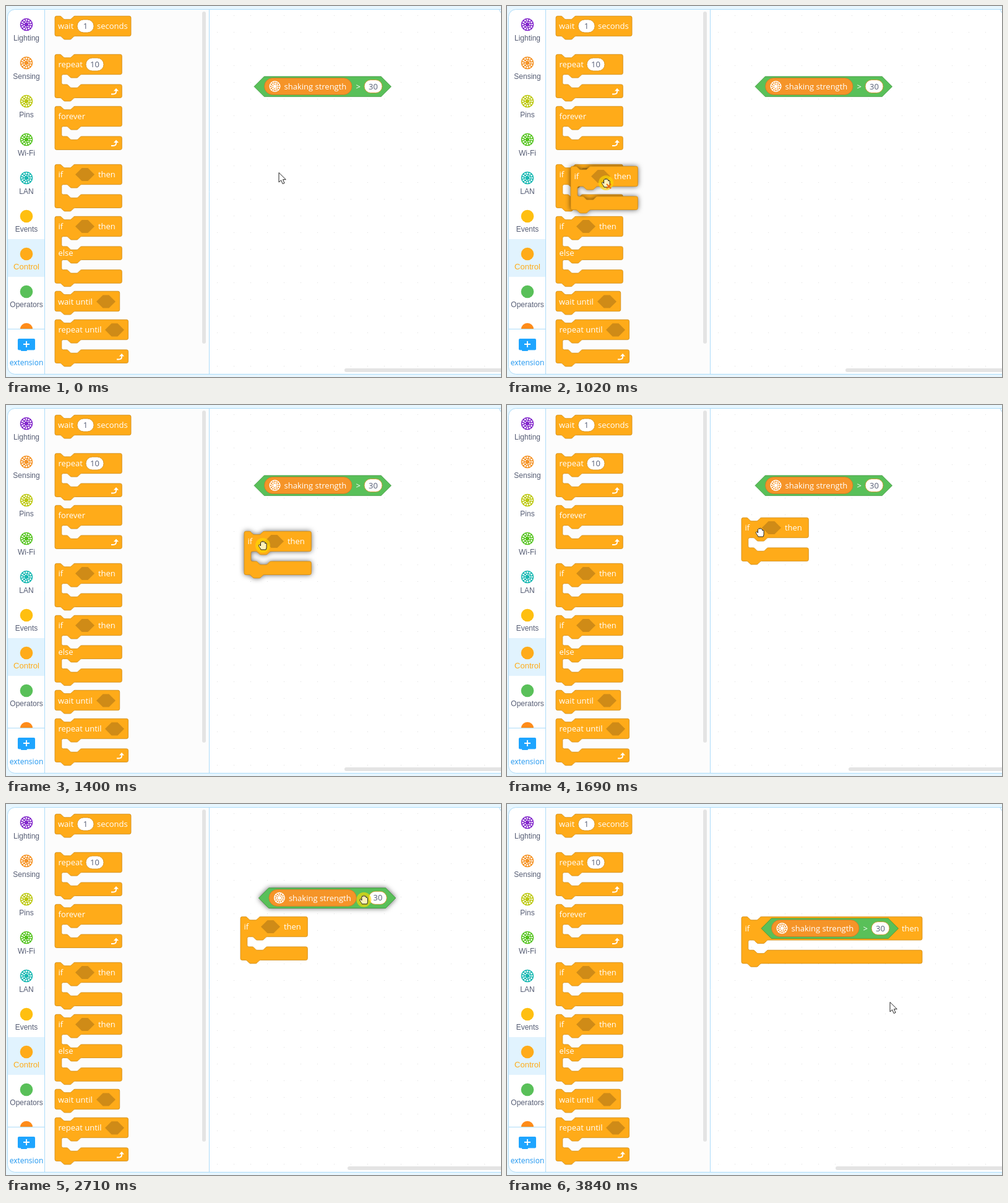
Animation of 800x600 px, one loop 4120 ms. Source, as an HTML page with a canvas:

```html
<!DOCTYPE html>
<html lang="en">
<head>
<meta charset="utf-8">
<title>Block editor</title>
<style>
  html, body { margin: 0; width: 100%; height: 100%; overflow: hidden; }
  canvas { display: block; }
</style>
</head>
<body>
<canvas id="stage" width="800" height="600"></canvas>
<script>
const ctx = document.getElementById('stage').getContext('2d');
const LOOP = 4120, UNIT = 0.675;
const ORANGE = '#ffab19', BROWN = '#cf8b17', GREEN = '#59c059', LINE = '#addcf9', INK = '#575e75';
const LABEL = '13px "Open Sans", sans-serif', SIDE = '12px "Liberation Sans", Arial, sans-serif';

const TICKS = [0, 180, 270, 370, 460, 560, 650, 730, 820, 920, 1020, 1130, 1220, 1300, 1400, 1480,
  1570, 1670, 1760, 1970, 2060, 2150, 2230, 2330, 2430, 2510, 2610, 2710, 2810, 2910, 3010,
  3090, 3170, 3450, 3540, 3640, 3740, 3840];

// Waypoints: [time, x, y]
const POINTER = [[90, 441, 269], [650, 132, 287], [820, 109, 280], [920, 112, 281], [1020, 160, 286],
  [1130, 291, 265], [1220, 371, 238], [1300, 398, 229], [1400, 415, 227], [1570, 409, 206],
  [1670, 409, 206], [1760, 404, 210], [1880, 404, 210], [2230, 586, 160], [2430, 571, 136],
  [2510, 571, 133], [3010, 592, 195], [3170, 583, 204], [3360, 583, 204], [3840, 619, 320]];
const IF_PATH = [[920, 79, 256], [1020, 103, 259], [1130, 263, 235], [1220, 343, 214],
  [1300, 370, 206], [1400, 385, 204], [1570, 379, 182]];
const TEST_PATH = [[2510, 401, 130], [3010, 422, 192], [3170, 413, 201], [3450, 411, 201]];

function along(path, t) {
  const i = path.findIndex(p => p[0] > t);
  if (i === 0) return path[0].slice(1);
  if (i < 0) return path[path.length - 1].slice(1);
  const a = path[i - 1], b = path[i];
  const u = (t - a[0]) / (b[0] - a[0]), k = u * u * (3 - 2 * u);
  return [a[1] + (b[1] - a[1]) * k, a[2] + (b[2] - a[2]) * k];
}

function text(str, x, y, color = '#fff', font = LABEL, align = 'left') {
  ctx.font = font;
  ctx.textAlign = align;
  ctx.fillStyle = color;
  ctx.fillText(str, x, y);
}

function rect(x, y, w, h, color) {
  ctx.fillStyle = color;
  ctx.fillRect(x, y, w, h);
}

function pill(x, y, w, h, color, border, r = h / 2) {
  ctx.beginPath();
  ctx.roundRect(x, y, w, h, r);
  ctx.fillStyle = color;
  ctx.fill();
  if (border) { ctx.strokeStyle = border; ctx.lineWidth = 0.8; ctx.stroke(); }
}

function disc(x, y, r, color) {
  ctx.beginPath();
  ctx.arc(x, y, r, 0, 7);
  ctx.fillStyle = color;
  ctx.fill();
}

function line(color, width, ...pts) {
  ctx.beginPath();
  pts.forEach(([x, y]) => ctx.lineTo(x, y));
  ctx.strokeStyle = color;
  ctx.lineWidth = width;
  ctx.stroke();
}

function dottedDisc(x, y, r, color, dots) {
  disc(x, y, r, color);
  for (const [n, dist, size] of [[12, 0.72, 0.13], [7, 0.4, 0.11]])
    for (let i = 0; i < n; i++) {
      const a = i / n * Math.PI * 2;
      disc(x + Math.cos(a) * r * dist, y + Math.sin(a) * r * dist, r * size, dots);
    }
}

function hexagon(x, cy, w, half) {
  ctx.beginPath();
  [[0, 0], [half, -half], [w - half, -half], [w, 0], [w - half, half], [half, half]]
    .forEach(([dx, dy]) => ctx.lineTo(x + dx, cy + dy));
  ctx.closePath();
}

function slot(x, cy, lit) {
  hexagon(x, cy, 31, 10.6);
  ctx.fillStyle = BROWN;
  ctx.fill();
  if (lit) { ctx.strokeStyle = '#fff'; ctx.lineWidth = 2.5; ctx.stroke(); }
}

function number(str, x, cy, w) {
  pill(x, cy - 10.5, w, 21, '#fff', BROWN);
  text(str, x + w / 2, cy + 4.5, INK, LABEL, 'center');
}

function liftShadow(on) {
  ctx.shadowColor = on ? 'rgba(0,0,0,.65)' : 'transparent';
  ctx.shadowBlur = on ? 8 : 0;
}

const NOTCH = 'c2,0 3,1 4,2l4,4c1,1 2,2 4,2h12c2,0 3,-1 4,-2l4,-4c1,-1 2,-2 4,-2';
const BUMP = 'c-2,0 -3,1 -4,2l-4,4c-1,1 -2,2 -4,2h-12c-2,0 -3,-1 -4,-2l-4,-4c-1,-1 -2,-2 -4,-2';

// Rows are the heights of the solid bars; an open mouth sits between each two
function block(x, y, width, rows, { lifted = false, cap = false } = {}) {
  const w = width / UNIT, top = `h8${NOTCH}H${w - 4}a4,4 0 0 1 4,4`;
  const d = `M0,4a4,4 0 0 1 4,-4${top}` + rows.map(h => `v${h - 8}a4,4 0 0 1 -4,4`)
    .join(`H64${BUMP}h-8a4,4 0 0 0 -4,4v16a4,4 0 0 0 4,4${top}`) +
    (cap ? '' : `H48${BUMP}`) + 'H4a4,4 0 0 1 -4,-4z';
  const shape = new Path2D(d);
  ctx.save();
  ctx.translate(x, y + 0.3);
  ctx.scale(UNIT, UNIT);
  liftShadow(lifted);
  ctx.fillStyle = ORANGE;
  ctx.fill(shape);
  liftShadow(false);
  ctx.strokeStyle = BROWN;
  ctx.lineWidth = 1.2;
  ctx.stroke(shape);
  ctx.restore();
}

function loopArrow(x, y) {
  ctx.strokeStyle = '#fff';
  ctx.lineWidth = 1.8;
  ctx.stroke(new Path2D(`M${x - 6},${y + 4}h3q5,0 5,-4v-2`));
  ctx.fillStyle = '#fff';
  ctx.fill(new Path2D(`M${x - 2},${y - 1}l4,-4.5l4,4.5z`));
}

function ifBlock(x, y, { lifted, lit, wide } = {}) {
  block(x, y, wide ? 292 : 108.3, [wide ? 56 : 48, 32], { lifted });
  const base = y + (wide ? 24 : 21);
  text('if', x + 5.5, base);
  text('then', x + (wide ? 259 : 70), base);
  if (!wide) slot(x + 33, y + 16.5, lit);
}

function testBlock(x, cy, lifted) {
  hexagon(x, cy + 0.3, 221.5, 16.3);
  liftShadow(lifted);
  ctx.fillStyle = GREEN;
  ctx.fill();
  liftShadow(false);
  ctx.strokeStyle = '#389438';
  ctx.lineWidth = 0.8;
  ctx.stroke();
  pill(x + 16.5, cy - 13.5, 141.5, 27, '#f59428', '#c87a24');
  dottedDisc(x + 33.5, cy, 9, '#fff', '#f59428');
  text('shaking strength', x + 48.5, cy + 5);
  text('>', x + 164.5, cy + 5);
  number('30', x + 178, cy, 29);
}

function sidebar() {
  rect(3, 377, 59, 61, '#e1f3fe');
  const items = [['Lighting', '#8429cc'], ['Sensing', '#f59428'], ['Pins', '#bcc80f'], ['Wi-Fi', '#55c41e'],
    ['LAN', '#1bb9b3'], ['Events', '#ffbf10'], ['Control', ORANGE], ['Operators', GREEN]];
  items.forEach(([name, color], i) => {
    const y = i < 5 ? 30 + 62 * i : 340 + 61 * (i - 5);
    if (i < 5) dottedDisc(33, y, 10.3, color, '#fff');
    else disc(33, y, 10.3, color);
    const active = name === 'Control';
    text(name, 33, y + (i < 5 ? 26 : 25), active ? ORANGE : INK, active ? SIDE.replace('12', '13') : SIDE, 'center');
  });
  disc(33, 523, 10.3, '#ff8c1a');
  rect(3, 522, 59, 73, '#fff');
  line(LINE, 1, [3, 522.5], [62, 522.5]);
  pill(19, 538, 28, 18.5, '#1ea5ff', null, 2);
  pill(24, 554, 10, 4, '#1ea5ff', null, 1);
  line('#fff', 1.8, [28, 547], [38, 547]);
  line('#fff', 1.8, [33, 542], [33, 552]);
  text('extension', 33, 581, '#1e96f0', '12px "Open Sans", sans-serif', 'center');
}

function palette() {
  rect(63, 6, 265, 589, '#fcfcfc');
  block(79, 16, 123, [48]);
  text('wait', 84, 37);
  number('1', 115, 32.5, 27);
  text('seconds', 147, 37);

  block(79, 78, 108.3, [48, 32]);
  text('repeat', 84.5, 99);
  number('10', 129, 94.5, 29);
  loopArrow(176, 138.5);

  block(79, 162, 108.3, [48, 32], { cap: true });
  text('forever', 84.5, 183);
  loopArrow(176, 222);

  ifBlock(79, 256);

  block(79, 340, 108.3, [48, 32, 32]);
  text('if', 84.5, 361);
  text('then', 149, 361);
  slot(112, 356.5);
  text('else', 84.5, 404);

  block(79, 461, 104.7, [48]);
  text('wait until', 84, 483);
  slot(146, 478);

  block(79, 507, 118.5, [48, 32]);
  text('repeat until', 84.5, 528);
  slot(160, 523.8);
  loopArrow(185, 567.5);
  pill(317, 9, 6, 537, '#e4e4e4');
}

function trash() {
  rect(3, 6, 325, 589, 'rgba(0,0,0,.215)');
  const cream = '#fbf6ea';
  ctx.fillStyle = cream;
  ctx.fill(new Path2D('M149.5,289h33l-1,34h-31z'));
  for (const x of [155.5, 164.5, 173.5]) rect(x, 294, 3, 24, '#c58a2b');
  line(cream, 5, [147, 287], [183, 281]);
  line(cream, 3, [159, 284], [160, 280], [170, 278.5], [171, 282]);
}

function pointer(x, y, hand, pressed, denied) {
  ctx.save();
  ctx.translate(x, y);
  ctx.lineJoin = 'round';
  ctx.lineWidth = 1;
  ctx.strokeStyle = '#222';
  if (pressed) disc(0, 0, 12, 'rgba(255,216,0,.65)');
  const shape = new Path2D(hand
    ? 'M-3,7C-4,4 -8,1 -6,-1C-5,-2 -4,0 -3.5,1V-5q1,-2 2.4,0v-1q1.2,-2 2.4,0v1q1.2,-2 2.4,0v2q1.4,-1.5 2.4,0V3Q6,5 5,7z'
    : 'M0,.5V16l3.6,-3.3L6.2,18.6l2.8,-1.2L6.5,11.7h4.8z');
  ctx.fillStyle = pressed ? '#fff2b8' : '#fff';
  ctx.fill(shape);
  ctx.stroke(shape);
  if (denied) {
    line('#f06a10', 2, [1, 2], [8, 9]);
    line('#f06a10', 2, [8, 2], [1, 9]);
  }
  ctx.restore();
}

function draw(t) {
  const within = (a, b) => t >= a && t < b;
  const dropped = t >= 1670, joined = t >= 3450;

  rect(0, 0, 800, 600, '#e7f6fe');
  ctx.save();
  pill(2.5, 5.5, 830, 590, '#fff', null, 12);
  ctx.clip();
  for (let x = 341; x < 800; x += 27)
    for (let y = 15; y < 595; y += 27) rect(x, y, 1, 1, '#dedede');
  sidebar();
  palette();
  if (within(1130, 1220)) trash();
  ctx.restore();
  for (const x of [62.5, 328.5]) line(LINE, 1, [x, 6], [x, 595]);
  ctx.beginPath();
  ctx.roundRect(2.5, 5.5, 830, 590, 12);
  ctx.stroke();
  line(LINE, 1, [797, 6], [800, 11]);
  const bar = joined ? 531 : dropped ? 552 : 547;
  pill(bar, 586, 830 - bar, 6, '#e4e4e4');

  const ifOptions = { lifted: !dropped, lit: within(2910, 3450), wide: joined };
  const drawIf = () => t >= 920 && ifBlock(...along(IF_PATH, t), ifOptions);
  const drawTest = () => testBlock(...along(TEST_PATH, t), within(2510, 3450));
  for (const part of dropped ? [drawIf, drawTest] : [drawTest, drawIf]) part();

  const hand = within(650, 1970) || within(2430, 3450);
  const pressed = within(820, 1670) || within(2510, 3450);
  pointer(...along(POINTER, t), hand, pressed, within(1020, 1130));
}

function frame(now) {
  const t = now % LOOP;
  draw(TICKS.findLast(tick => tick <= t));
  requestAnimationFrame(frame);
}
requestAnimationFrame(frame);
</script>
</body>
</html>
```
